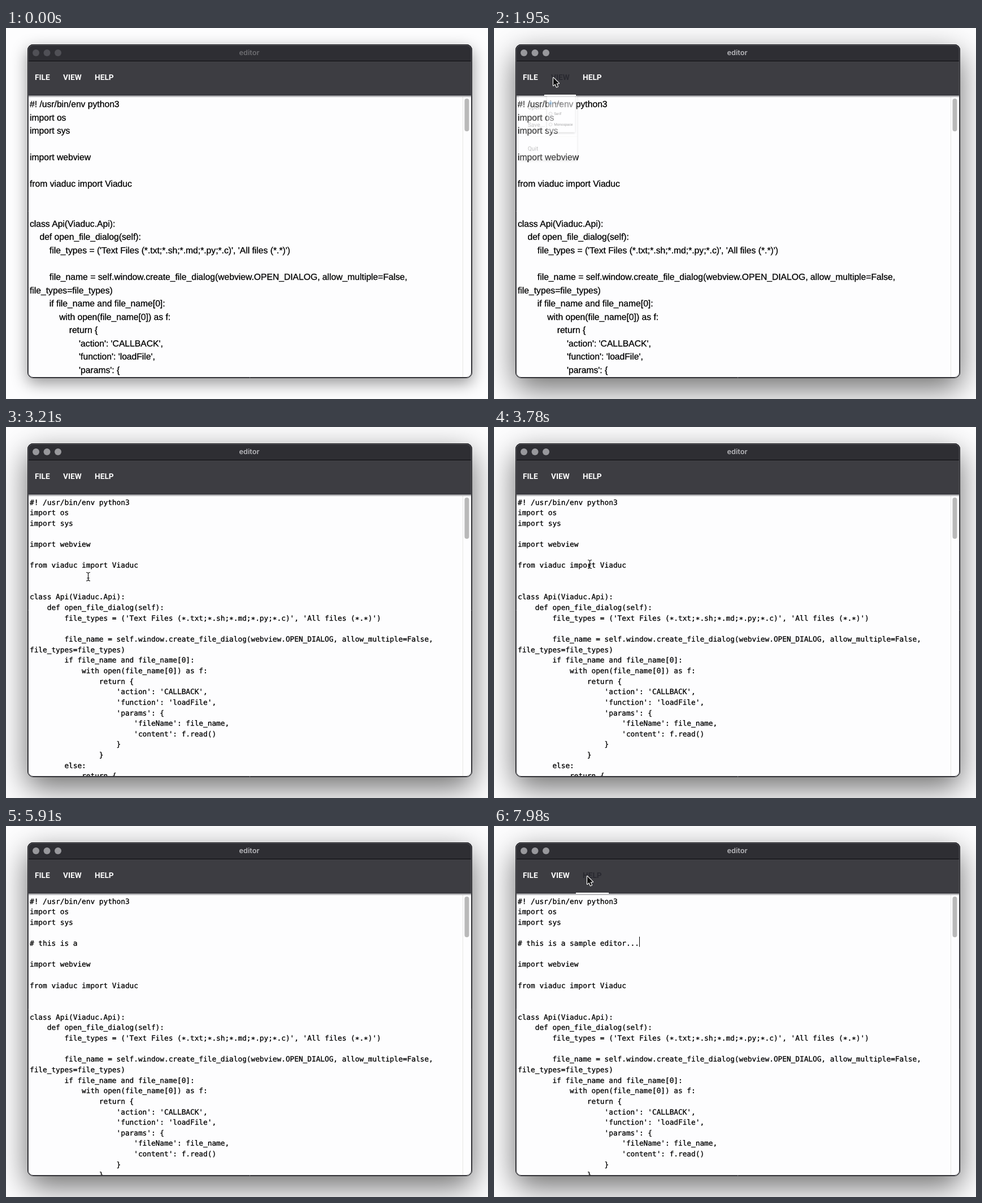
An HTML page with a canvas that plays this animation: 853x657 px, repeating every 8000 ms.

```html
<!DOCTYPE html>
<html lang="en">
<head>
<meta charset="utf-8">
<title>editor</title>
<style>
  html, body { margin: 0; width: 100%; height: 100%; overflow: hidden; background: #fdfdfe; }
  canvas { display: block; width: 100vw; height: 100vh; }
</style>
</head>
<body>
<canvas id="stage" width="853" height="657"></canvas>
<script>
const ctx = document.getElementById('stage').getContext('2d');
const LOOP = 8000;

const CODE = `#! /usr/bin/env python3
import os
import sys

import webview

from viaduc import Viaduc


class Api(Viaduc.Api):
    def open_file_dialog(self):
        file_types = ('Text Files (*.txt;*.sh;*.md;*.py;*.c)', 'All files (*.*)')

        file_name = self.window.create_file_dialog(webview.OPEN_DIALOG, allow_multiple=False,
file_types=file_types)
        if file_name and file_name[0]:
            with open(file_name[0]) as f:
                return {
                    'action': 'CALLBACK',
                    'function': 'loadFile',
                    'params': {
                        'fileName': file_name,
                        'content': f.read()
                    }
                }
        else:
            return {`.split('\n');

// The monospace face has its asterisk at mid-height
const SANS = { font: '15.68px "Liberation Sans", sans-serif', y: 140, step: 23.54, thumb: 59, star: '*' };
const MONO = { font: '12.75px "DejaVu Sans Mono", monospace', y: 137.5, step: 18.65, thumb: 74, star: '\u2217' };
const COMMENT = '# this is a sample editor...';

// Times of the events, in ms
const ACTIVATE = 450, FILE_ON = 700, VIEW_ON = 1870, PICK = 2450, HELP_ON = 7900;
const CLICK = 4280, ENTERS = [4400, 4520], KEY_GAP = 65;
const BURSTS = [{ at: 4650, from: 0, to: 12 }, { at: 6000, from: 12, to: COMMENT.length }];
const KEYS = [];
for (const b of BURSTS) {
  for (let i = b.from; i < b.to; i++) KEYS.push(b.at + (i - b.from) * KEY_GAP);
}

const TABS = [
  { label: 'FILE', x: 51, left: 39, right: 89, on: FILE_ON, off: VIEW_ON },
  { label: 'VIEW', x: 101, left: 89, right: 145, on: VIEW_ON, off: PICK },
  { label: 'HELP', x: 157, left: 145, right: 203, on: HELP_ON, off: LOOP }
];

// Pointer path: time, x, y
const PATH = [
  [200, -14, 300], [700, 71, 96], [1500, 71, 96], [1870, 105, 88], [2050, 105, 88],
  [2420, 140, 246], [2500, 140, 246], [2700, 145, 265], [3300, 145, 265],
  [3780, 169, 243], [4250, 120, 171], [7400, 120, 171], [7940, 165, 89], [8000, 165, 89]
];

const clamp = v => Math.max(0, Math.min(1, v));
const ease = p => p * p * (3 - 2 * p);
const within = (t, a, b) => t >= a && t < b;

function rect(x, y, w, h, color) {
  ctx.fillStyle = color;
  ctx.fillRect(x, y, w, h);
}

function round(x, y, w, h, r) {
  ctx.beginPath();
  ctx.roundRect(x, y, w, h, r);
}

function outline(inset, color) {
  round(38 + inset, 29 + inset, 787 - 2 * inset, 591 - 2 * inset, 10 - inset);
  ctx.lineWidth = 1;
  ctx.strokeStyle = color;
  ctx.stroke();
}

function dot(x, y, r, color) {
  ctx.beginPath();
  ctx.arc(x, y, r, 0, Math.PI * 2);
  ctx.fillStyle = color;
  ctx.fill();
}

function text(str, x, y, font, color, weight = 0) {
  ctx.font = font;
  ctx.fillStyle = color;
  ctx.fillText(str, x, y);
  if (!weight) return;
  ctx.lineWidth = weight;
  ctx.strokeStyle = color;
  ctx.strokeText(str, x, y);
}

function shadow(color, blur, dy) {
  ctx.shadowColor = color;
  ctx.shadowBlur = blur;
  ctx.shadowOffsetY = dy;
}

function drawFrame(active) {
  ctx.save();
  if (active) shadow('rgba(0,0,0,.58)', 54, 18);
  else shadow('rgba(0,0,0,.42)', 28, 9);
  round(38, 29, 787, 591, 10);
  ctx.fillStyle = '#2e2e35';
  ctx.fill();
  ctx.restore();
}

function drawBars(t, active) {
  rect(38, 29, 787, 30, '#2e2e33');
  rect(38, 58, 787, 1, '#0c0c10');
  rect(38, 59, 787, 61, '#3d3d42');
  for (const x of [53, 72.5, 92]) dot(x, 44, 6, active ? '#98989c' : '#505056');
  ctx.textAlign = 'center';
  text('editor', 430.5, 48, '600 12.8px Inter, sans-serif', active ? '#b6b6ba' : '#6c6c70');
  ctx.textAlign = 'left';
  for (const tab of TABS) {
    const on = within(t, tab.on, tab.off);
    text(tab.label, tab.x, 92, '600 13.7px Roboto, sans-serif', on ? '#292930' : '#fff');
    if (on) rect(tab.left, 118, tab.right - tab.left, 2, '#fff');
  }
}

function drawEditor(t) {
  const style = t < PICK ? SANS : MONO;
  const added = ENTERS.filter(e => t >= e).length;
  const typed = KEYS.filter(k => t >= k).length;
  const lines = CODE.slice();
  const extra = ['', COMMENT.slice(0, typed)].slice(0, added);
  lines.splice(3, 0, ...extra);

  rect(39, 120, 785, 500, '#fdfdfe');
  rect(39, 121, 785, 1, '#85858a');
  rect(808, 122, 1, 497, '#e6e6e4');
  round(811.5, 125, 8, style.thumb - (added ? 2 : 1), 4);
  ctx.fillStyle = '#b9b9b9';
  ctx.fill();

  ctx.save();
  ctx.beginPath();
  ctx.rect(39, 122, 769, 496);
  ctx.clip();
  lines.forEach((line, i) => {
    text(line.replaceAll('*', style.star), 42, style.y + i * style.step, style.font, '#000', 0.3);
  });
  drawCaret(t, style, added, lines);
  ctx.restore();
}

function drawCaret(t, style, added, lines) {
  if (t < CLICK) return;
  const last = Math.max(...[CLICK, ...ENTERS, ...KEYS].filter(k => k <= t));
  if (Math.floor((t - last) / 500) % 2) return;
  const row = 2 + added;
  const x = 42 + ctx.measureText(lines[row]).width;
  rect(Math.round(x), Math.round(style.y + row * style.step - 16), 1, 18, '#000');
}

// The shadow stays outside the panel, so a fading panel keeps its white
function drawPanelShadow(w, h) {
  ctx.save();
  ctx.beginPath();
  ctx.rect(-10, 0, w + 20, h + 10);
  ctx.rect(0, 0, w, h);
  ctx.clip('evenodd');
  shadow('rgba(0,0,0,.4)', 4, 1);
  rect(0, 0, w, h, '#fdfdfe');
  ctx.restore();
}

function drawMenu(x, w, h, scale, alpha, content) {
  if (alpha <= 0) return;
  ctx.save();
  ctx.globalAlpha = alpha;
  ctx.translate(x, 121);
  ctx.scale(scale, scale);
  drawPanelShadow(w, h);
  rect(0, 0, w, h, '#fdfdfe');
  content();
  ctx.restore();
}

const item = (label, x, y) => text(label, x, y, '15.7px Roboto, sans-serif', '#212121');

function fileItems() {
  item('Open...', 24, 35);
  item('Save...', 24, 82);
  rect(0, 108.5, 157, 1, '#e4e4e0');
  item('Quit', 24, 146);
}

function viewItems() {
  ['Sans', 'Serif', 'Monospace'].forEach((label, i) => {
    const y = 29 + i * 47;
    ctx.beginPath();
    ctx.arc(15, y, 7, 0, Math.PI * 2);
    ctx.lineWidth = 1.5;
    ctx.strokeStyle = i ? '#777' : '#2196f3';
    ctx.stroke();
    if (!i) dot(15, y, 4, '#2196f3');
    item(label, 30, y + 6);
  });
}

function drawMenus(t) {
  const fileIn = clamp((t - FILE_ON) / 200);
  const fileOut = clamp((t - VIEW_ON) / 200);
  const fileScale = fileOut ? 1 - 0.85 * fileOut : fileIn;
  drawMenu(44, 157, 172, fileScale, fileOut ? (1 - fileOut) ** 2.5 : fileIn, fileItems);

  const viewIn = clamp((t - VIEW_ON) / 200);
  const viewOut = clamp((t - PICK) / 200);
  const viewScale = viewOut ? 1 - 0.85 * viewOut : viewIn;
  drawMenu(94, 122, 157, viewScale, viewOut ? (1 - viewOut) ** 2.5 : viewIn, viewItems);
}

function pointerAt(t) {
  let i = 0;
  while (i < PATH.length - 2 && t >= PATH[i + 1][0]) i++;
  const [t0, x0, y0] = PATH[i], [t1, x1, y1] = PATH[i + 1];
  const p = ease(clamp((t - t0) / (t1 - t0)));
  return [x0 + (x1 - x0) * p, y0 + (y1 - y0) * p];
}

function drawArrow() {
  ctx.beginPath();
  ctx.moveTo(0, 0);
  for (const [x, y] of [[0, 14], [3.2, 11], [5.7, 16.6], [8, 15.6], [5.6, 10.2], [10, 10]]) ctx.lineTo(x, y);
  ctx.closePath();
  ctx.lineJoin = 'round';
  ctx.lineWidth = 2.2;
  ctx.strokeStyle = '#fff';
  ctx.stroke();
  ctx.fillStyle = '#111';
  ctx.fill();
}

function drawBeam() {
  ctx.beginPath();
  for (const side of [-1, 1]) {
    ctx.moveTo(-3.5, 7.5 * side);
    ctx.quadraticCurveTo(0, 7.5 * side, 0, 5 * side);
    ctx.quadraticCurveTo(0, 7.5 * side, 3.5, 7.5 * side);
  }
  ctx.moveTo(0, -5);
  ctx.lineTo(0, 5);
  ctx.moveTo(-2, 2.5);
  ctx.lineTo(2, 2.5);
  ctx.lineWidth = 1.2;
  ctx.strokeStyle = '#111';
  ctx.stroke();
}

function drawPointer(t) {
  if (t < PATH[0][0] || within(t, ENTERS[0], 7400)) return;
  const [x, y] = pointerAt(t);
  const onMenu = within(t, FILE_ON, PICK + 100);
  ctx.save();
  ctx.translate(Math.round(x), Math.round(y));
  if (x > 39 && y > 121 && !onMenu) {
    ctx.translate(0.5, 0);
    drawBeam();
  } else {
    drawArrow();
  }
  ctx.restore();
}

function draw(t) {
  const active = t >= ACTIVATE;
  ctx.textRendering = 'geometricPrecision';
  rect(0, 0, 853, 657, '#fdfdfe');
  drawFrame(active);
  ctx.save();
  round(38, 29, 787, 591, 10);
  ctx.clip();
  drawBars(t, active);
  drawEditor(t);
  drawMenus(t);
  ctx.restore();
  outline(0.5, '#111114');
  outline(1.5, '#5c5c62');
  drawPointer(t);
}

const start = performance.now();
function tick() {
  draw((performance.now() - start) % LOOP);
  requestAnimationFrame(tick);
}
tick();
</script>
</body>
</html>
```
